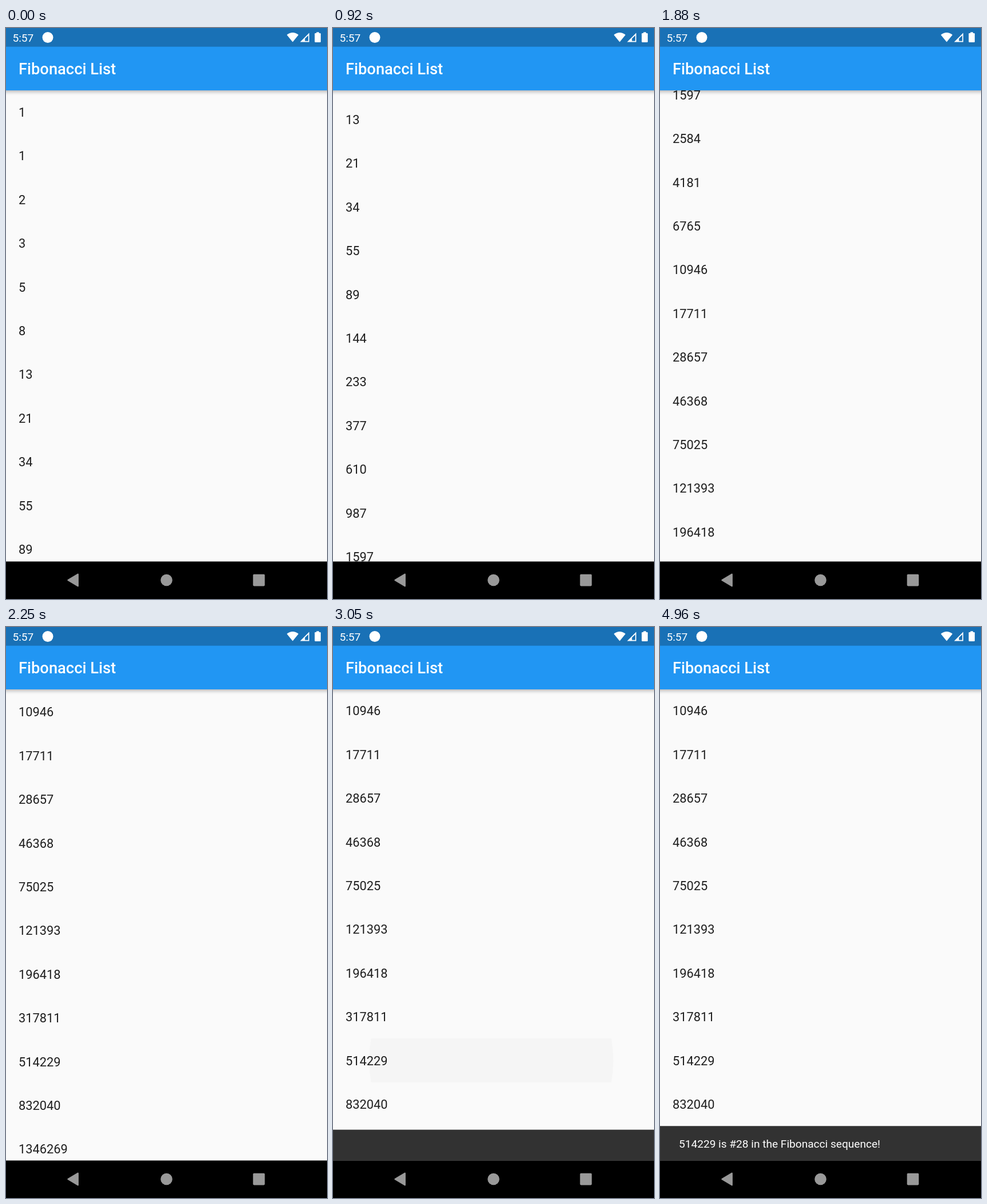
An HTML page with a canvas for the animation above (5040 ms loop, 561x998 px).

```html
<!DOCTYPE html>
<html lang="en">
<head>
<meta charset="utf-8">
<title>Fibonacci List</title>
<style>
  html, body { margin: 0; width: 100%; height: 100%; overflow: hidden; background: #000; }
  canvas { display: block; width: 561px; height: 998px; }
</style>
</head>
<body>
<canvas id="stage" width="561" height="998"></canvas>
<script>
const W = 561, H = 998, LOOP = 5040;
const BAR_TOP = 32.7, LIST_TOP = 109, NAV_TOP = 932.6;
const ROW = 76.4, FIRST_ROW = 147;
const SNACK_H = 60.4, TAP = 2895, TAP_ROW = 28, TAP_X = 276.5;
const FLING_MS = 650;
const flings = [{ at: 320, to: 447 }, { at: 955, to: 959 }, { at: 1650, to: 1528.7 }];

const ctx = document.getElementById('stage').getContext('2d');
const clamp01 = x => Math.min(1, Math.max(0, x));

const fib = [1, 1];
while (fib.length < 36) fib.push(fib.at(-1) + fib.at(-2));

// Short drag that turns into a decelerating fling
const flingEase = u => 1 - (1 - u ** 1.3) ** 2.4;

// Cubic bezier (0.4, 0, 0.2, 1)
function fastOutSlowIn(x) {
  let lo = 0, hi = 1;
  for (let i = 0; i < 20; i++) {
    const s = (lo + hi) / 2, r = 1 - s;
    if (1.2 * r * r * s + 0.6 * r * s * s + s ** 3 < x) lo = s; else hi = s;
  }
  const s = (lo + hi) / 2;
  return s * s * (3 - 2 * s);
}

function scrollAt(t) {
  let pos = 0;
  for (const f of flings) pos += (f.to - pos) * flingEase(clamp01((t - f.at) / FLING_MS));
  return pos;
}

function rect(x, y, w, h, color) {
  ctx.fillStyle = color;
  ctx.fillRect(x, y, w, h);
}

function circle(x, y, r, color) {
  ctx.fillStyle = color;
  ctx.beginPath();
  ctx.arc(x, y, r, 0, Math.PI * 2);
  ctx.fill();
}

function poly(points, color, join = 0) {
  ctx.beginPath();
  points.forEach(([x, y]) => ctx.lineTo(x, y));
  ctx.closePath();
  ctx.fillStyle = ctx.strokeStyle = color;
  ctx.fill();
  if (join) {
    ctx.lineJoin = 'round';
    ctx.lineWidth = join;
    ctx.stroke();
  }
}

function roundBox(x, y, w, h, r, color) {
  ctx.fillStyle = color;
  ctx.beginPath();
  ctx.roundRect(x, y, w, h, r);
  ctx.fill();
}

function text(str, x, y, size, color, weight = 400) {
  ctx.font = `${weight} ${size}px Roboto, sans-serif`;
  ctx.fillStyle = color;
  ctx.fillText(str, x, y);
}

function drawSplash(t, scroll) {
  const age = t - TAP;
  if (age < 0 || age > 200) return;
  const y = FIRST_ROW + TAP_ROW * ROW - scroll;
  ctx.save();
  ctx.beginPath();
  ctx.rect(0, y - ROW / 2, W, ROW);
  ctx.clip();
  circle(TAP_X, y, 212 * age / 155, `rgba(180,180,180,${0.4 * (1 - age / 200)})`);
  ctx.restore();
}

function drawList(t) {
  const scroll = scrollAt(t);
  rect(0, LIST_TOP, W, NAV_TOP - LIST_TOP, '#fafafa');
  drawSplash(t, scroll);
  fib.forEach((n, i) => {
    const y = FIRST_ROW + i * ROW - scroll;
    if (y > LIST_TOP - ROW && y < NAV_TOP + ROW) text(n, 22, y + 8, 21.8, '#1e1e1e');
  });
}

function drawSnackbar(t) {
  const u = clamp01((t - TAP) / 250);
  if (!u) return;
  const top = NAV_TOP - SNACK_H * fastOutSlowIn(u);
  rect(0, top, W, NAV_TOP - top, '#323232');
  const fade = fastOutSlowIn(clamp01((u - 0.72) / 0.28));
  if (fade > 0) text('514229 is #28 in the Fibonacci sequence!', 33, top + 37.5, 19.1, `rgba(255,255,255,${fade})`);
}

function drawStatusIcons() {
  circle(73, 16.5, 9.5, '#fff');

  ctx.fillStyle = '#fff';
  ctx.beginPath();
  ctx.moveTo(501, 24.5);
  ctx.lineTo(490.8, 12);
  ctx.quadraticCurveTo(501, 4.2, 511.2, 12);
  ctx.closePath();
  ctx.fill();

  poly([[530, 8.5], [530, 24.5], [514, 24.5]], '#fff');
  poly([[528.3, 13], [528.3, 22.8], [522.5, 22.8], [522.5, 18.6]], '#1971b6');

  roundBox(539.5, 9, 10.6, 16, 1.3, '#fff');
  rect(542.5, 7.3, 4.6, 2.2, '#fff');
}

function drawAppBar() {
  ctx.save();
  ctx.shadowColor = 'rgba(0,0,0,0.32)';
  ctx.shadowBlur = 7;
  ctx.shadowOffsetY = 2;
  rect(-10, 0, W + 20, LIST_TOP, '#2196f3');
  ctx.restore();
  rect(0, 0, W, BAR_TOP, '#1971b6');
  text('5:57', 11.5, 23.7, 19.1, '#fff');
  drawStatusIcons();
  text('Fibonacci List', 22, 81, 27.3, '#fff', 500);
}

function drawNav() {
  const gray = '#999';
  rect(0, NAV_TOP, W, H - NAV_TOP, '#000');
  poly([[108.5, 965], [125.7, 954.8], [125.7, 975.2]], gray, 2.4);
  circle(280.5, 965, 10.3, gray);
  roundBox(431.7, 954.8, 20.6, 20.6, 1.8, gray);
}

function frame() {
  const t = performance.now() % LOOP;
  drawList(t);
  drawSnackbar(t);
  drawAppBar();
  drawNav();
  requestAnimationFrame(frame);
}
frame();
</script>
</body>
</html>
```
